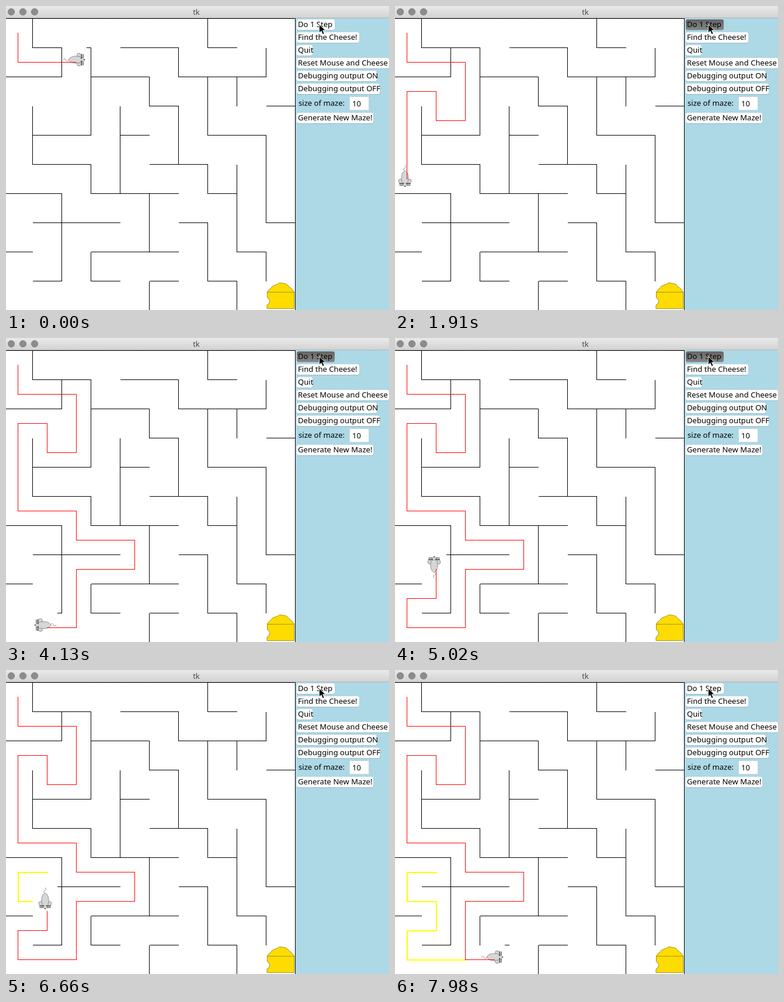
Animation of 656x521 px, one loop 8000 ms. Source, as an HTML page:

```html
<!DOCTYPE html>
<html lang="en">
<head>
<meta charset="utf-8">
<title>tk</title>
<style>
  html, body { margin: 0; width: 100%; height: 100%; overflow: hidden; background: #fff; }
  svg { display: block; width: 656px; height: 521px; }
  text { font: 13.1px "Noto Sans", "Open Sans", sans-serif; fill: #000; white-space: pre; }
  .line { fill: none; stroke-width: 1; stroke-linecap: square; shape-rendering: crispEdges; }
  .wall { stroke: #000; stroke-linecap: butt; }
  .red { stroke: #f00; }
  .yellow { stroke: #ff0; stroke-width: 2; }
</style>
</head>
<body>
<svg viewBox="0 0 656 521" id="stage">
  <defs>
    <linearGradient id="bar" x2="0" y2="1">
      <stop stop-color="#e9e9e9"/><stop offset="1" stop-color="#d2d2d2"/>
    </linearGradient>
    <linearGradient id="pressed" x2="0" y2="1">
      <stop stop-color="#646464"/><stop offset="1" stop-color="#868686"/>
    </linearGradient>
  </defs>
  <rect width="656" height="521" fill="#fff"/>
  <rect x="496" y="21" width="160" height="500" fill="#add8e6"/>
  <path id="walls" class="line wall"/>

  <g stroke="#a58f10" fill="#ffdc00">
    <path d="M447.5 490l3-4 3-2 3-4 5-2 3-1 4-2.5 5 .5 3 .5 4 1 3 3.5 4 3 3 3 3 4v28.500h-46.500v-6l3-2 2-5-2-4-2.500-1.500z"/>
    <path d="M447.500 490.500h46"/>
  </g>

  <path id="red" class="line red"/>
  <path id="yellow" class="line yellow"/>
  <g id="mouse">
    <rect x="-21" y="-21" width="42" height="42" fill="#fff"/>
    <g fill="#d6d6d6" stroke="#858585" stroke-width=".9">
      <path fill="none" d="M-19 0c3-2 4-1.500 5 .8s2 3 3.500 .7 1.500-2 3-1.500"/>
      <circle cx="8" cy="-7.500" r="3.400"/>
      <circle cx="8" cy="7.500" r="3.400"/>
      <path d="M-10 0C-7-5-2-6 3-6 9-6 14-4 18 0 14 4 9 6 3 6-2 6-7 5-10 0z"/>
    </g>
    <path d="M12.500-10V-3M15-9.500V-3M12.500 10V3M15 9.500V3" stroke="#111" fill="none"/>
    <path d="M11-2.500h1.500M11 2.500h1.500M16.500 0h1.500" stroke="#222" stroke-width="1.500"/>
  </g>
  <path id="latest"/>

  <rect width="656" height="21" fill="url(#bar)"/>
  <path class="line" stroke="#b4b4b4" d="M0 20.500H656"/>
  <path class="line" stroke="#000" d="M0 21.500H495"/>
  <g fill="#8c8c8c" stroke="#7b7b7b" stroke-width=".8">
    <circle cx="9" cy="10" r="5.700"/><circle cx="29" cy="10" r="5.700"/><circle cx="49" cy="10" r="5.700"/>
  </g>
  <text x="326" y="15" text-anchor="middle" style="fill:#4a4a4a">tk</text>

  <g id="panel"></g>
  <text x="501" y="171">size of maze:</text>
  <rect x="588.500" y="155.500" width="33" height="23" fill="#fff" stroke="#c9d6da"/>
  <text x="593" y="172">10</text>
  <path d="M536.500 31.500v14.500l3.400-3.200 2.600 5.800 2.600-1.200-2.500-5.600h4.700z" fill="#000" stroke="#fff" stroke-width=".9"/>
</svg>
<script>
const $ = id => document.getElementById(id);
const set = (el, attrs) => {
  for (const key in attrs) el.setAttribute(key, attrs[key]);
  return el;
};
const add = (parent, tag, attrs) =>
  parent.appendChild(set(document.createElementNS(parent.namespaceURI, tag), attrs));

// Buttons: label, top edge, width
const buttons = [
  ['Do 1 Step', 23, 65], ['Find the Cheese!', 45, 107], ['Quit', 67, 27],
  ['Reset Mouse and Cheese', 89, 158], ['Debugging output ON', 111, 137],
  ['Debugging output OFF', 133, 142], ['Generate New Maze!', 183, 131]
].map(([label, y, width]) => {
  const box = { x: 498, width, height: 18, rx: 3.5 };
  add($('panel'), 'rect', { ...box, y: y + .8, fill: '#8fb0bb' });
  const face = add($('panel'), 'rect', { ...box, y, fill: '#fff' });
  add($('panel'), 'text', { x: 500, y: y + 13 }).textContent = label;
  return face;
});

// Walls per grid line, each as start and end grid index (a = 10)
const rows = ['', '13 46 78', '02 35 69', '56 9a', '13 45 79', '13 57', '02 36 78',
  '14 67 9a', '01 36 89', '12 34 56 78'];
const columns = ['', '01 35', '12 69', '14 56 89', '36', '23 68 9a', '12 35',
  '01 24 56 79', '23 58 9a', '12 47 89', '0a'];
const gridX = i => 50 * i - 4.5, gridY = j => 50 * j + 21.5;
const spans = (list, draw) => list.map((line, i) =>
  line.split(' ').filter(Boolean).map(s => draw(i, parseInt(s[0], 36), parseInt(s[1], 36))).join('')).join('');
$('walls').setAttribute('d',
  spans(rows, (j, a, b) => `M${gridX(a)} ${gridY(j)}H${gridX(b)}`) +
  spans(columns, (i, a, b) => `M${gridX(i)} ${gridY(a)}V${gridY(b)}`));

// The walk; one click either turns the mouse or moves it one cell
const route = 'DRR' + 'DDLULDDD' + 'RRDRRD' + 'LLDDL' + 'LURULUR' + 'LDRDLDRR' + 'R';
const startMoves = 3, backFrom = 29, backTo = 37;
const headings = { R: [1, 0, 0], D: [0, 1, 90], L: [-1, 0, 180], U: [0, -1, 270] };
const isBack = move => move >= backFrom && move < backTo;

const points = [[20, 46]];
const clicks = [{ moves: startMoves, heading: 'R', turned: false }];
[...route].forEach((heading, i) => {
  const [dx, dy] = headings[heading], [x, y] = points[i];
  points.push([x + 50 * dx, y + 50 * dy]);
  if (i < startMoves) return;
  if (clicks.at(-1).heading !== heading) clicks.push({ moves: i, heading, turned: true });
  clicks.push({ moves: i + 1, heading, turned: false });
});

const segment = i => {
  const shift = isBack(i) ? 1 : .5;
  const at = p => p.map(v => v + shift).join(' ');
  return `M${at(points[i])}L${at(points[i + 1])}`;
};

// Screen refreshes: most show one more click, a few show two
const refreshes = 53;
const doubles = [6, 14, 18, 22, 33, 37, 44];
const held = [[5, 13], [26, 33], [36, 41], [45, 50]];
const refreshTime = k => k < 8 ? 150 * (k + 1) : 148 * k + 130;

function show(k) {
  const { moves, heading, turned } = clicks[k + doubles.filter(d => d <= k).length];
  const settled = turned ? moves : moves - 1;
  let red = '', yellow = '';
  for (let i = 0; i < settled; i++) isBack(i) ? yellow += segment(i) : red += segment(i);
  set($('red'), { d: red });
  set($('yellow'), { d: yellow });
  set($('latest'), {
    d: turned ? '' : segment(moves - 1),
    class: 'line ' + (isBack(moves - 1) ? 'yellow' : 'red')
  });
  const [x, y] = points[moves];
  set($('mouse'), { transform: `translate(${x - 3} ${y - 4}) rotate(${headings[heading][2]})` });
  const down = held.some(([a, b]) => k >= a && k <= b);
  set(buttons[0], { fill: down ? 'url(#pressed)' : '#fff' });
}

const start = performance.now();
let shown = -1;
function tick() {
  const t = (performance.now() - start) % 8000;
  let k = 0;
  while (k < refreshes && refreshTime(k + 1) <= t) k++;
  if (k !== shown) show(shown = k);
  requestAnimationFrame(tick);
}
tick();
</script>
</body>
</html>
```
